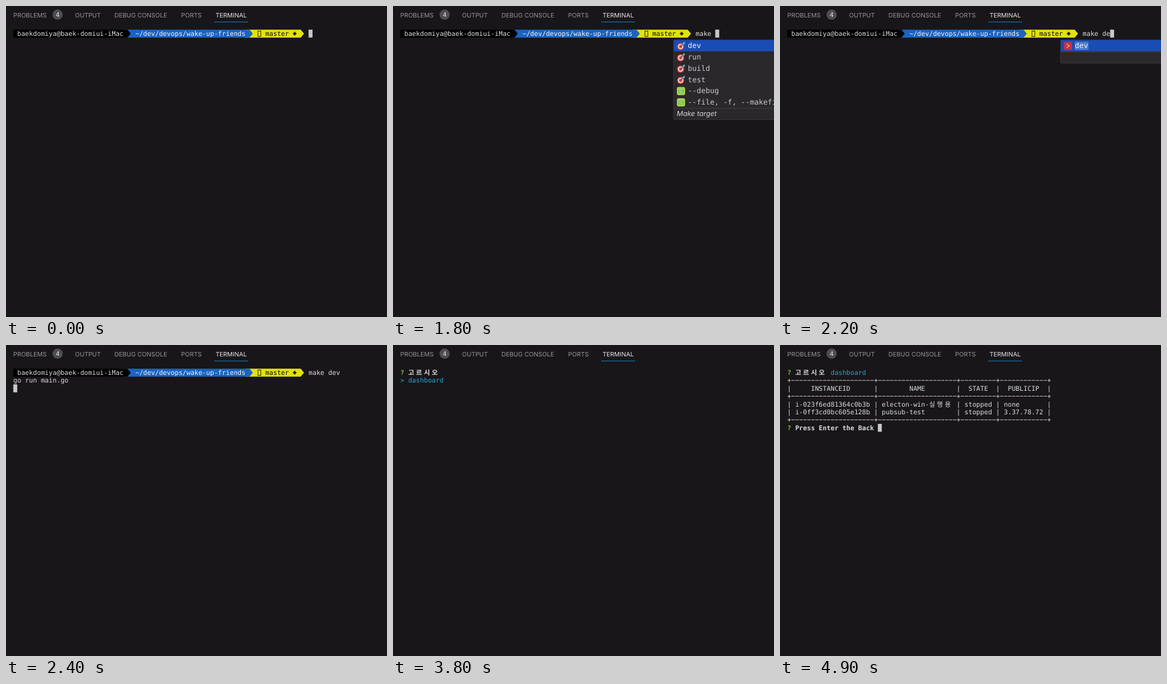
Write an HTML page that moves like this. It is 600 px wide and 489 px high and loops after 5000 ms.

```html
<!DOCTYPE html>
<html lang="en">
<head>
<meta charset="utf-8">
<title>Terminal</title>
<style>
  html, body { margin: 0; width: 100%; height: 100%; overflow: hidden; background: #181619; }
  svg { display: block; width: 100vw; height: 100vh; }
  text { white-space: pre; text-rendering: geometricPrecision; }
  .tab { font: 9.7px Inter, sans-serif; fill: #969598; }
  .on { fill: #e7e7e7; }
  .term { font: 10.3px "DejaVu Sans Mono", monospace; fill: #dcdcdc; }
  .wide { font-family: "Noto Sans CJK KR", "Noto Sans CJK", sans-serif; }
  .bold { font-weight: 700; }
  .green { fill: #74bf4b; }
  .cyan { fill: #2ba2d2; }
  .white { fill: #f2f4f8; }
  .black { fill: #0c0c00; }
  .item { font: 11.6px "DejaVu Sans Mono", monospace; fill: #c9c9cb; }
  .pick { fill: #f0f2f8; }
  .note { font: italic 11px Inter, sans-serif; fill: #d4d4d6; }
</style>
</head>
<body>
<svg viewBox="0 0 600 489">
  <rect width="600" height="489" fill="#181619"/>
  <g class="tab">
    <text class="tab" x="11.5" y="17.5">PROBLEMS</text>
    <circle cx="81.3" cy="13.6" r="8" fill="#4e4d51"/>
    <text class="tab on" x="81.3" y="17" text-anchor="middle" font-weight="600">4</text>
    <text class="tab" x="108.8" y="17.5">OUTPUT</text>
    <text class="tab" x="170.7" y="17.5">DEBUG CONSOLE</text>
    <text class="tab" x="275.8" y="17.5">PORTS</text>
    <text class="tab on" x="330" y="17.5">TERMINAL</text>
    <rect x="328" y="24.6" width="53.3" height="1" fill="#1a7db8"/>
  </g>
  <g id="screen"></g>
  <g id="popup"></g>
</svg>
<script>
const LOOP = 5000;
const X0 = 11.5, Y0 = 37.2, CW = 6.2, RH = 12.4;
const screen = document.getElementById('screen');
const popup = document.getElementById('popup');

function add(parent, tag, attrs, text) {
  const el = document.createElementNS('http://www.w3.org/2000/svg', tag);
  for (const k in attrs) el.setAttribute(k, attrs[k]);
  if (text !== undefined) el.textContent = text;
  parent.append(el);
  return el;
}
const colX = c => X0 + c * CW;
const rowY = r => Y0 + r * RH;
const rect = (g, x, y, width, height, fill, rx = 0) =>
  add(g, 'rect', { x, y, width, height, fill, rx });

// Hangul takes two cells per character; everything else takes one.
function put(col, row, str, cls = '') {
  for (const run of str.match(/[가-힣]|[^가-힣]+/g)) {
    const wide = /[가-힣]/.test(run);
    add(screen, 'text', {
      x: colX(col), y: rowY(row) + 9.7,
      class: `term ${cls} ${wide ? 'wide' : ''}`
    }, run);
    col += wide ? 2 : run.length;
  }
}
const cursor = (col, row) => rect(screen, colX(col), rowY(row), CW, RH, '#c9c8ca');

// A prompt segment ending in an arrow tip.
function segment(from, to, fill) {
  const a = colX(from), b = colX(to), h = RH + .2;
  add(screen, 'path', { d: `M${a} ${Y0}H${b}l5.2 ${h / 2}L${b} ${Y0 + h}H${a}z`, fill });
}

function prompt(typed) {
  segment(59, 73, '#e3e012');
  segment(28, 60, '#1a64c1');
  segment(0, 29, '#000');
  put(1, 0, 'baekdomiya@baek-domiui-iMac');
  put(31, 0, '~/dev/devops/wake-up-friends', 'white');
  add(screen, 'rect', { x: 396.8, y: 39.3, width: 4.4, height: 8.6, fill: 'none', stroke: '#161600', 'stroke-width': .9 });
  put(64, 0, 'master', 'black');
  add(screen, 'path', { d: 'M451.8 43.5h5.6M454.6 40.7v5.6', stroke: '#161600', 'stroke-width': 2.2 });
  if (typed) put(75, 0, typed);
}

function typing(typed) {
  prompt(typed);
  cursor(75 + typed.length, 0);
}

function running() {
  prompt('make dev');
  put(0, 1, 'go run main.go');
  cursor(0, 2);
}

function question() {
  put(0, 0, '?', 'green bold');
  put(2, 0, '고르시오', 'bold');
}

function choosing() {
  question();
  put(0, 1, '> dashboard', 'cyan');
}

function answered() {
  question();
  put(11, 0, 'dashboard', 'cyan');
}

function waiting() {
  answered();
  cursor(0, 1);
}

const EDGES = [0, 22, 43, 53, 66];
function rule(row) {
  const y = rowY(row) + 6.1;
  EDGES.forEach((c, i) => {
    put(c, row, '+');
    if (i) add(screen, 'path', {
      d: `M${colX(EDGES[i - 1] + 1) + .5} ${y}H${colX(c)}`,
      stroke: '#cfcfcf', 'stroke-width': .9, 'stroke-dasharray': '5.2 1'
    });
  });
}
function cells(row, values, cols) {
  EDGES.forEach(c => put(c, row, '|'));
  values.forEach((v, i) => put(cols[i], row, v));
}

function table() {
  const left = [2, 24, 45, 55];
  answered();
  [1, 3, 6].forEach(rule);
  cells(2, ['INSTANCEID', 'NAME', 'STATE', 'PUBLICIP'], [6, 31, 46, 56]);
  cells(4, ['i-023f6ed81364c0b3b', 'electon-win-실행용', 'stopped', 'none'], left);
  cells(5, ['i-0ff3cd0bc605e128b', 'pubsub-test', 'stopped', '3.37.78.72'], left);
  put(0, 7, '?', 'green bold');
  put(2, 7, 'Press Enter the Back', 'bold');
  cursor(23, 7);
}

const icons = {
  dart(y) {
    [[5.7, '#d5403f'], [4, '#eee4e4'], [2.5, '#d5403f']].forEach(([r, fill]) =>
      add(popup, 'circle', { cx: 452.9, cy: y + 1.2, r, fill }));
    add(popup, 'path', { d: `M453 ${y + 1}l4-4`, stroke: '#41566a', 'stroke-width': 1.3 });
    add(popup, 'path', { d: `M456.3 ${y - 2.2}l3-3`, stroke: '#6fa9cc', 'stroke-width': 2.6 });
  },
  option(y) {
    rect(popup, 447, y - 6.3, 13, 13, '#a9cf3c', 3);
    add(popup, 'circle', { cx: 453.5, cy: y + .2, r: 4.6, fill: '#6cbd62' });
    add(popup, 'path', {
      d: `M450 ${y - 2}q3.5 -3 6.5 0M450.5 ${y + 1}q3 -3 6 1M451 ${y + 3.5}q2 -2 4.5 0`,
      fill: 'none', stroke: '#dcecb0', 'stroke-width': .9
    });
  },
  go(y) {
    rect(popup, 447, y - 6.3, 13, 13, '#cb2f3f', 3);
    add(popup, 'path', {
      d: `M451.2 ${y - 2.8}l5 2.9l-5 2.9`, fill: 'none', stroke: '#f0dcde', 'stroke-width': 1
    });
  }
};

function list(items, note, match) {
  const pitch = 17.75, top = 53.6, foot = top + items.length * pitch + .4;
  rect(popup, 441.4, top - .8, 170, foot - top + 19.4, '#3d3b3f', 2);
  rect(popup, 442.3, top, 170, foot - top + 17.7, '#2a282b', 1);
  rect(popup, 442.3, top, 170, pitch, '#1a4cb6');
  rect(popup, 442.3, foot, 170, .9, '#454347');
  if (match) rect(popup, 464.2, 56.2, 21.6, 13, '#4a78cc');
  items.forEach(([icon, name], i) => {
    const y = top + pitch * (i + .5);
    icons[icon](y);
    add(popup, 'text', { x: 464.3, y: y + 4, class: i ? 'item' : 'item pick' }, name);
  });
  if (note) add(popup, 'text', { x: 446.8, y: foot + 12.9, class: 'note' }, note);
}

const targets = () => list([
  ['dart', 'dev'], ['dart', 'run'], ['dart', 'build'], ['dart', 'test'],
  ['option', '--debug'], ['option', '--file, -f, --makefile']
], 'Make target');
const single = () => list([['go', 'dev']], '', true);

const type = str => () => typing(str);
const steps = [
  [0, type('')],
  [1100, type('m')],
  [1400, type('ma')],
  [1500, type('mak')],
  [1600, type('make')],
  [1700, type('make ')],
  [1800, type('make '), targets],
  [2000, type('make d'), targets],
  [2100, type('make d'), single],
  [2200, type('make de'), single],
  [2300, type('make dev'), single],
  [2400, running],
  [3800, choosing],
  [4400, waiting],
  [4600, table]
];

let shown = null;
const start = performance.now();
function frame() {
  const t = Math.max(0, performance.now() - start) % LOOP;
  const step = steps.findLast(s => s[0] <= t);
  if (step !== shown) {
    shown = step;
    screen.replaceChildren();
    popup.replaceChildren();
    step[1]();
    if (step[2]) step[2]();
  }
  requestAnimationFrame(frame);
}
frame();
</script>
</body>
</html>
```
